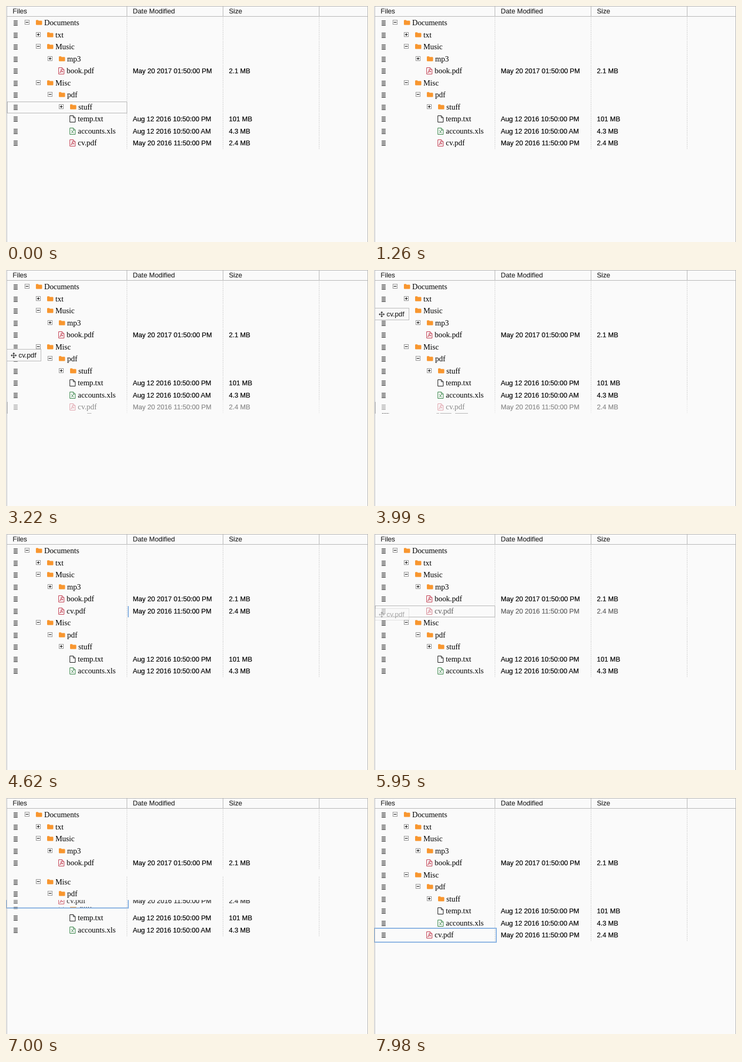
An HTML page that plays this animation: 678 px wide and 442 px high, repeating every 8000 ms.

```html
<!DOCTYPE html>
<html lang="en">
<head>
<meta charset="utf-8">
<title>File tree</title>
<style>
  html, body { margin: 0; width: 100%; height: 100%; overflow: hidden; background: #fafafa; }
  svg { display: block; width: 678px; height: 442px; }
  .name { font: 14.4px "Liberation Serif", serif; fill: #000; }
  .cell { font: 12.65px "Liberation Sans", sans-serif; fill: #000; stroke: #000; stroke-width: .2px; }
  .head { font: 12.8px "Liberation Sans", sans-serif; fill: #222; stroke: #222; stroke-width: .12px; }
  .crisp { shape-rendering: crispEdges; }
</style>
</head>
<body>
<svg id="stage" viewBox="0 0 678 442" xmlns="http://www.w3.org/2000/svg">
  <rect width="678" height="442" fill="#fafafa"/>
  <g id="rows"></g>
  <g id="marks" class="crisp" fill="none" stroke="#b4b4b4"></g>
  <g class="crisp" stroke="#b4b4b4" fill="none">
    <path d="M1.5 442V.5H677.5V442M2 19.5H677M226.5 1V20M406.5 1V20M586.5 1V20"/>
  </g>
  <g class="head">
    <text x="12.5" y="14">Files</text>
    <text x="237.5" y="14">Date Modified</text>
    <text x="417.5" y="14">Size</text>
  </g>
  <g id="ghost">
    <rect class="crisp" x="1.5" y=".5" width="64" height="22" fill="#f8f8f8" stroke="#b9b9b9"/>
    <path d="M10 12H19M14.5 7.5V16.5M11.5 10.3L9.7 12L11.5 13.7M17.5 10.3L19.3 12L17.5 13.7M12.8 9L14.5 7.2L16.2 9M12.8 15L14.5 16.8L16.2 15"
      fill="none" stroke="#333" stroke-width="1.1"/>
    <text class="head" x="23.5" y="16">cv.pdf</text>
  </g>
</svg>
<script>
const LOOP = 8000, ROW_H = 22.5;
const DROP1 = 4400, DROP2 = 6915, MOVE = 200;
const $ = id => document.getElementById(id);

const clamp = v => Math.max(0, Math.min(1, v));
const ramp = (t, from, to) => clamp((t - from) / (to - from));
const smooth = p => p * p * (3 - 2 * p);
const within = (t, from, to) => t >= from && t < to;
const rowY = i => Math.floor(31.95 + ROW_H * i);
const indentX = level => Math.round(level * 21.4);

// Listed in paint order; i is the resting line, level the indent.
const items = [
  { name: 'Documents', i: 0, level: 0, kind: 'open' },
  { name: 'txt', i: 1, level: 1, kind: 'closed' },
  { name: 'Music', i: 2, level: 1, kind: 'open' },
  { name: 'mp3', i: 3, level: 2, kind: 'closed' },
  { name: 'book.pdf', i: 4, level: 2, kind: 'pdf', date: 'May 20 2017 01:50:00 PM', size: '2.1 MB' },
  { name: 'stuff', i: 7, level: 3, kind: 'closed' },
  { name: 'temp.txt', i: 8, level: 3, kind: 'txt', date: 'Aug 12 2016 10:50:00 PM', size: '101 MB' },
  { name: 'accounts.xls', i: 9, level: 3, kind: 'xls', date: 'Aug 12 2016 10:50:00 AM', size: '4.3 MB' },
  { name: 'cv.pdf', i: 10, level: 3, kind: 'pdf', date: 'May 20 2016 11:50:00 PM', size: '2.4 MB' },
  { name: 'Misc', i: 5, level: 1, kind: 'open' },
  { name: 'pdf', i: 6, level: 2, kind: 'open' }
];

const inks = { pdf: '#bf3347', xls: '#2f8040', txt: '#111' };
const glyphs = {
  pdf: 'M100.5 125C102 124 103.3 121 103.2 118.6C104 122 105.5 123.3 107 123.2C104.5 122.6 102.5 123.4 100.5 125',
  xls: 'M101.3 119.8L105.7 125.3M105.7 119.8L101.3 125.3',
  txt: ''
};

function folder(kind) {
  const plus = kind === 'closed' ? 'M39.5 -3V2' : '';
  return `<g class="crisp"><rect x="35.5" y="-4.5" width="8" height="8" fill="#f4f4f4" stroke="#999"/>
    <path d="M37 -.5H42${plus}" stroke="#000"/></g>
    <path d="M56 -3.5Q56 -4.7 57.2 -4.7H59.8Q60.8 -4.7 60.8 -3.4H66.3Q67.6 -3.4 67.6 -2.1V3.3Q67.6 4.6 66.3 4.6H57.3Q56 4.6 56 3.3Z" fill="#f8962f"/>`;
}

function file(kind) {
  return `<g transform="translate(-43 -121)" fill="none" stroke="${inks[kind]}">
    <path d="M98.6 115.5H105L108.7 119.2V127.5H98.6ZM105 115.5V119.2H108.7"/>
    <path d="${glyphs[kind]}"/></g>`;
}

function handle() {
  let d = '';
  for (let c = 0; c < 3; c++)
    for (let r = 0; r < 4; r++) d += `M${14.7 + c * 2.5} ${-4 + r * 2.7}h1.6v1.6h-1.6z`;
  return `<path d="${d}" fill="#000"/>`;
}

function addRow(item) {
  const isFile = item.kind in inks;
  const g = document.createElementNS('http://www.w3.org/2000/svg', 'g');
  g.innerHTML = `<rect class="crisp" x="0" y="-11" width="677" height="23" fill="#fafafa"/>
    <g class="body">
      <path class="crisp" d="M226.5 -10V12M406.5 -10V12M586.5 -10V12" stroke="#d6d6d6" stroke-dasharray="3 1"/>
      ${handle()}
      <g class="indent">${isFile ? file(item.kind) : folder(item.kind)}
        <text class="name" x="${isFile ? 70.5 : 71.5}" y="5">${item.name}</text></g>
      <text class="cell" x="237.5" y="5">${item.date || ''}</text>
      <text class="cell" x="417.5" y="5">${item.size || ''}</text>
    </g>
    <rect class="focus crisp" x="0" y="-12" width="229" height="26" fill="none" stroke="#8ab3e2" stroke-width="2" visibility="hidden"/>`;
  $('rows').appendChild(g);
  item.g = g;
  item.body = g.querySelector('.body');
  item.indent = g.querySelector('.indent');
  item.focus = g.querySelector('.focus');
}
items.forEach(addRow);
const cv = items.find(it => it.name === 'cv.pdf');

const outline = y => `<rect x="2.5" y="${y - 9.5}" width="224" height="21"/>`;
const edge = (x, y) => `<path d="M${x} ${y - 9}V${y + 13}"/>`;

function drawMarks(t) {
  let s = '';
  const last = rowY(10), mid = rowY(5);
  if (t < 140) s += outline(rowY(7));
  if (within(t, 2060, 2240)) s += outline(last);
  if (within(t, 2240, 2900)) s += edge(226.5, last);
  if (within(t, 2240, DROP1)) s += edge(2.5, last);
  if (within(t, 2240, 3600)) s += '<path d="M152 268.5H160"/>';
  if (within(t, 3600, DROP1)) s += '<path d="M15 268.5H28" stroke-dasharray="2 1" stroke="#666"/><path d="M117 268.5H122M124 268.5H145M152 268.5H176"/>';
  if (within(t, DROP1 + 150, 4900)) s += `<path d="M229 ${mid - 9}V${mid + 12}" stroke="#8ab3e2" stroke-width="2"/>`;
  if (within(t, 5810, 6200)) s += outline(mid);
  $('marks').innerHTML = s;
}

function drawGhost(t) {
  const first = within(t, 2090, DROP1), second = within(t, 5810, DROP2);
  const start = first ? 2090 : 5810;
  const y = first
    ? 252 - 181 * smooth(ramp(t, 2450, 3850))
    : 139 + 22 * smooth(ramp(t, 6050, 6550));
  $('ghost').setAttribute('opacity', first || second ? ramp(t, start, start + 400) : 0);
  $('ghost').setAttribute('transform', `translate(0 ${Math.round(y)})`);
}

function render(t) {
  const shift = ramp(t, DROP1, DROP1 + MOVE) - ramp(t, DROP2, DROP2 + MOVE);
  for (const it of items) {
    const i = it === cv ? 10 - 5 * shift : it.i + (it.i >= 5 ? shift : 0);
    const level = it === cv && t >= DROP1 ? 2 : it.level;
    it.g.setAttribute('transform', `translate(0 ${rowY(i)})`);
    it.indent.setAttribute('transform', `translate(${indentX(level)} 0)`);
  }
  const fade = t < 5000
    ? ramp(t, 2060, 2270) - ramp(t, DROP1, DROP1 + MOVE)
    : ramp(t, 5810, 6020) - ramp(t, DROP2, DROP2 + 120);
  cv.body.setAttribute('opacity', 1 - 0.55 * fade);
  cv.focus.setAttribute('visibility', t >= DROP2 ? 'visible' : 'hidden');
  drawMarks(t);
  drawGhost(t);
}

const begin = performance.now();
function tick() {
  render((performance.now() - begin) % LOOP);
  requestAnimationFrame(tick);
}
tick();
</script>
</body>
</html>
```
